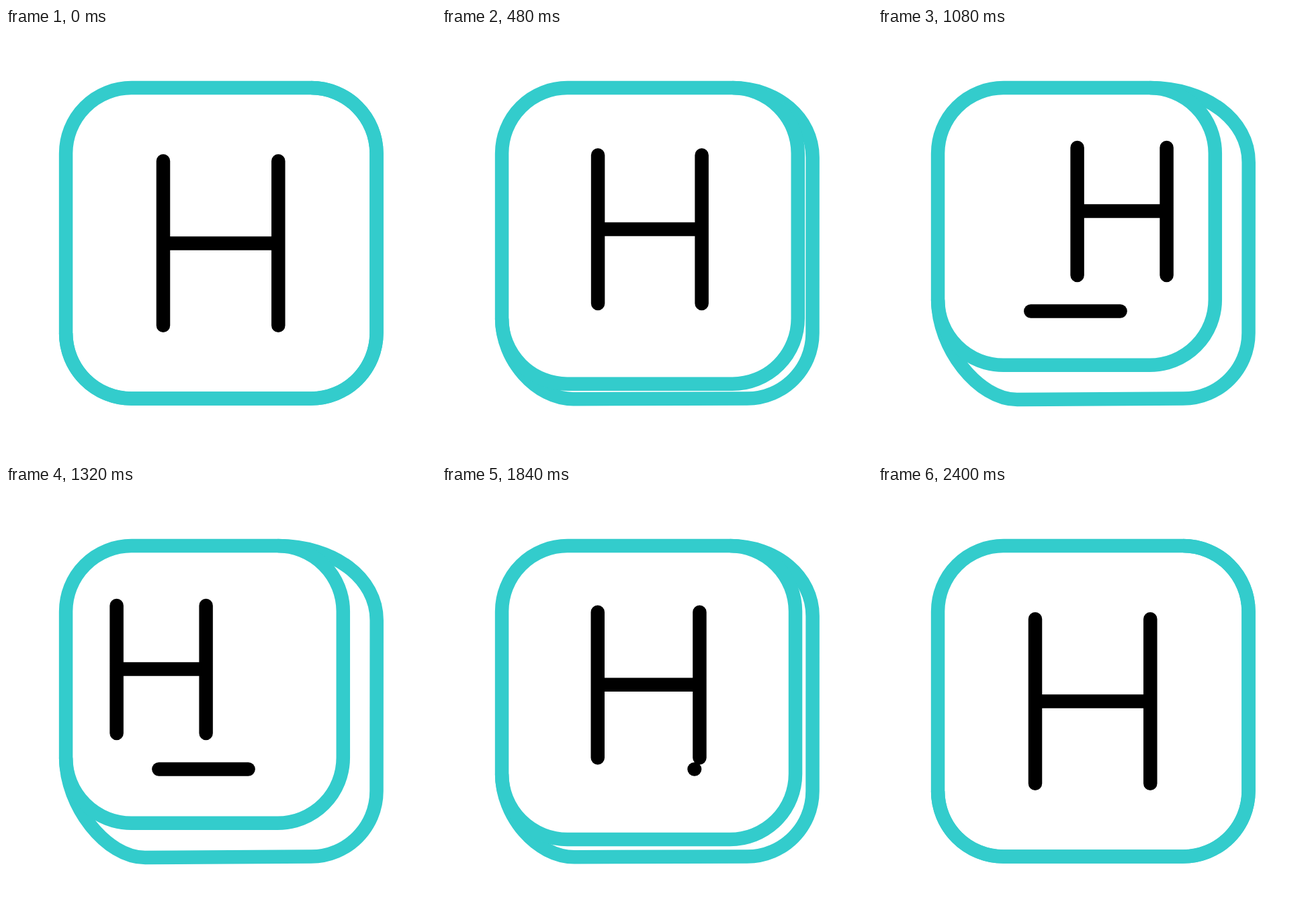
Animation of 640 by 640 pixels, one loop 2480 ms. Source, as an HTML page:

```html
<!DOCTYPE html>
<html lang="en">
<head>
<meta charset="utf-8">
<title>Key H</title>
<style>
  html, body { margin: 0; width: 100%; height: 100%; overflow: hidden; background: #fff; }
  svg { display: block; width: 100%; height: 100%; }
  path {
    fill: none;
    stroke: #3cc;
    stroke-width: 20.5;
    stroke-linejoin: round;
    animation: 2480ms linear infinite;
  }
  .ink { stroke: #000; stroke-linecap: round; }

  #side { animation-name: side; }
  #face { animation-name: face; }
  #letter { animation-name: letter; }
  #slide { animation: slide 2480ms linear infinite; }
  #line {
    stroke-dasharray: 1 1;
    animation: line 2480ms linear infinite, trim 2480ms linear infinite, show 2480ms step-end infinite;
  }

  /* the face shrinks towards the top left, then returns */
  @keyframes face {
    0%, 4.839% {
      d: path("M186.6 89.1H454a97.5 97.5 0 0 1 97.5 97.5V454a97.5 97.5 0 0 1 -97.5 97.5H186.6a97.5 97.5 0 0 1 -97.5 -97.5V186.6a97.5 97.5 0 0 1 97.5 -97.5z");
      animation-timing-function: cubic-bezier(.5, 0, .5, 1);
    }
    35.887%, 60.484% {
      d: path("M186.6 89.1H404.3a97.5 97.5 0 0 1 97.5 97.5V404.3a97.5 97.5 0 0 1 -97.5 97.5H186.6a97.5 97.5 0 0 1 -97.5 -97.5V186.6a97.5 97.5 0 0 1 97.5 -97.5z");
      animation-timing-function: cubic-bezier(.42, 0, .4, 1);
    }
    92.742%, 100% {
      d: path("M186.6 89.1H454a97.5 97.5 0 0 1 97.5 97.5V454a97.5 97.5 0 0 1 -97.5 97.5H186.6a97.5 97.5 0 0 1 -97.5 -97.5V186.6a97.5 97.5 0 0 1 97.5 -97.5z");
    }
  }
  @keyframes side {
    0%, 4.839% {
      d: path("M454 89.1C507.8 89.1 551.5 132.8 551.5 186.6L551.5 454C551.5 507.8 507.8 551.5 454 551.5L186.6 551.5C132.8 551.5 89.1 507.8 89.1 454");
      animation-timing-function: cubic-bezier(.5, 0, .5, 1);
    }
    35.887%, 60.484% {
      d: path("M404.3 89.1C488 89.1 551.7 136.7 551.7 200L551.5 454C551.5 507.8 507.8 551.5 454 551.5L207 553C149.5 553 89.1 476.6 89.1 404.3");
      animation-timing-function: cubic-bezier(.42, 0, .4, 1);
    }
    92.742%, 100% {
      d: path("M454 89.1C507.8 89.1 551.5 132.8 551.5 186.6L551.5 454C551.5 507.8 507.8 551.5 454 551.5L186.6 551.5C132.8 551.5 89.1 507.8 89.1 454");
    }
  }
  @keyframes letter {
    0%, 4.839% {
      d: path("M234 198V442.8M405.3 198V442.8M234 320.4H405.3");
      animation-timing-function: cubic-bezier(.5, 0, .5, 1);
    }
    35.887%, 60.484% {
      d: path("M229.6 178V368M362.6 178V368M229.6 272.4H362.6");
      animation-timing-function: cubic-bezier(.42, 0, .4, 1);
    }
    92.742%, 100% { d: path("M234 198V442.8M405.3 198V442.8M234 320.4H405.3"); }
  }
  @keyframes line {
    0%, 60.484% {
      d: path("M227.3 421.4L360.6 421.4");
      animation-timing-function: cubic-bezier(.42, 0, .4, 1);
    }
    92.742%, 100% { d: path("M227.3 421.4L392.3 421.4"); }
  }

  @keyframes slide {
    0%, 33.468% { transform: translateX(0); animation-timing-function: cubic-bezier(.333, 0, .667, 1); }
    43.548% { transform: translateX(67px); animation-timing-function: cubic-bezier(.333, 0, .667, 1); }
    54.032% { transform: translateX(-67px); animation-timing-function: cubic-bezier(.333, 0, .667, 1); }
    64.113%, 100% { transform: translateX(0); }
  }
  /* drawn from the left, wiped from the left */
  @keyframes trim {
    0%, 20.161% { stroke-dashoffset: 1; animation-timing-function: cubic-bezier(.333, 0, .667, 1); }
    33.145%, 52.903% { stroke-dashoffset: 0; animation-timing-function: cubic-bezier(.333, 0, .667, 1); }
    75%, 100% { stroke-dashoffset: -1; }
  }
  @keyframes show {
    0% { visibility: hidden; }
    20.161% { visibility: visible; }
    75%, 100% { visibility: hidden; }
  }
</style>
</head>
<body>
<svg viewBox="0 0 640 640">
  <path id="side" />
  <path id="face" />
  <path id="line" class="ink" pathLength="1" d="M227.3 421.4L360.6 421.4" />
  <g id="slide"><path id="letter" class="ink" /></g>
</svg>
</body>
</html>
```
